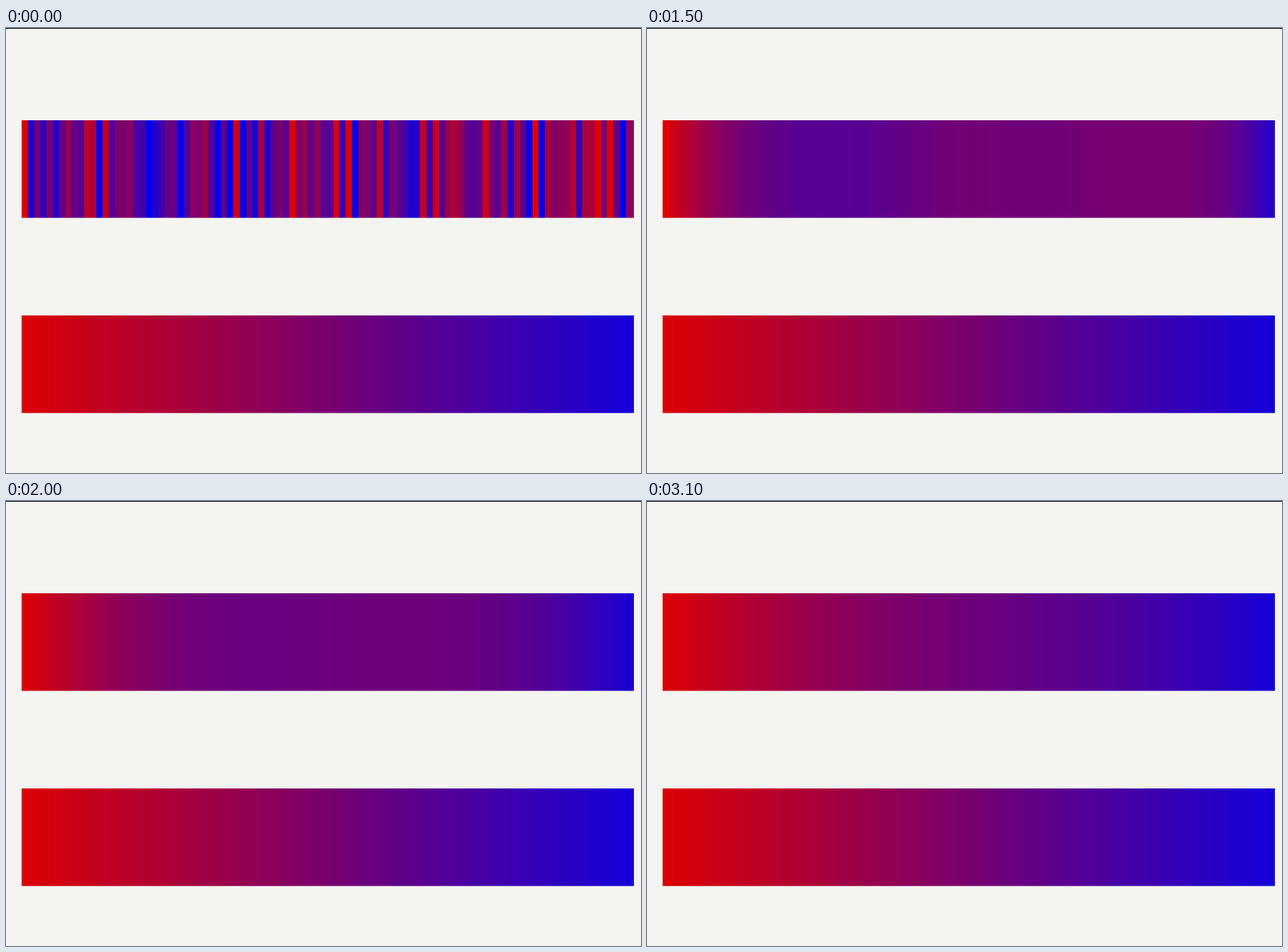
An HTML page with a canvas that plays this animation: 894 px wide and 627 px high, repeating every 5900 ms.

```html
<!DOCTYPE html>
<html lang="en">
<head>
<meta charset="utf-8">
<title>Heat diffusion</title>
<style>
  html, body { margin: 0; width: 100%; height: 100%; overflow: hidden; background: #f4f5f0; }
  canvas { display: block; width: 894px; height: 627px; }
</style>
</head>
<body>
<canvas id="stage" width="894" height="627"></canvas>
<script>
const ctx = document.getElementById('stage').getContext('2d');
const LOOP = 5900, HOLD = 1400, TICK = 100;
const CELLS = 100, VISIBLE = 98, LEFT = 22, RIGHT = 884, PITCH = 8.77, BAR_H = 137.5;
const RATE = 0.25, FIRST_STEPS = 32, STEPS = 100;
const COLD = 0.92, HOT = 0.02, NOISE = 0.75;

// Broad trend of the starting state: [cell, value], 0 is red and 1 is blue
const trend = [
  [0, 0.56], [7, 0.56], [13, 0.38], [21, 0.84], [28, 0.58], [35, 0.7], [43, 0.46],
  [50, 0.3], [59, 0.68], [66, 0.4], [74, 0.46], [81, 0.62], [92, 0.18], [99, 0.8]
];

function trendAt(i) {
  const k = Math.max(1, trend.findIndex(p => p[0] >= i));
  const [x0, v0] = trend[k - 1], [x1, v1] = trend[k];
  return v0 + (v1 - v0) * (i - x0) / (x1 - x0);
}

let seed = 20;
function random() {
  seed = (seed * 1664525 + 1013904223) % 4294967296;
  return seed / 4294967296;
}

// Differences of random numbers: sharp stripes that leave the trend unchanged
function randomStart() {
  let prev = random();
  return Array.from({ length: CELLS }, (_, i) => {
    const next = random();
    const v = trendAt(i) + NOISE * (next - prev);
    prev = next;
    if (i === 0) return HOT;
    if (i === CELLS - 1) return COLD;
    return Math.min(1, Math.max(0, v));
  });
}

// Explicit heat equation with both ends held fixed
function diffuse(cells, steps) {
  for (let s = 0; s < steps; s++) {
    cells = cells.map((v, i) =>
      i === 0 || i === CELLS - 1 ? v : v + RATE * (cells[i - 1] - 2 * v + cells[i + 1]));
  }
  return cells;
}

const steady = Array.from({ length: CELLS }, (_, i) => HOT + (COLD - HOT) * i / (CELLS - 1));
const states = [randomStart()];
for (let t = HOLD; t < LOOP; t += TICK) {
  states.push(diffuse(states[states.length - 1], t === HOLD ? FIRST_STEPS : STEPS));
}

const edge = i => i === VISIBLE ? RIGHT : Math.round(LEFT + PITCH * i);

function drawBar(cells, y) {
  for (let i = 0; i < VISIBLE; i++) {
    const v = cells[i];
    ctx.fillStyle = `rgb(${Math.round(224 * (1 - v))},0,${Math.round(240 * v)})`;
    ctx.fillRect(edge(i), y, edge(i + 1) - edge(i), BAR_H);
  }
}

function draw(t) {
  const k = t < HOLD ? 0 : 1 + Math.floor((t - HOLD) / TICK);
  ctx.fillStyle = '#f4f5f0';
  ctx.fillRect(0, 0, 894, 627);
  ctx.fillStyle = '#000';
  ctx.fillRect(0, 0, 894, 1);
  drawBar(states[k], 130);
  drawBar(steady, 405);
}

const begin = performance.now();
function loop() {
  draw((performance.now() - begin) % LOOP);
  requestAnimationFrame(loop);
}
loop();
</script>
</body>
</html>
```
